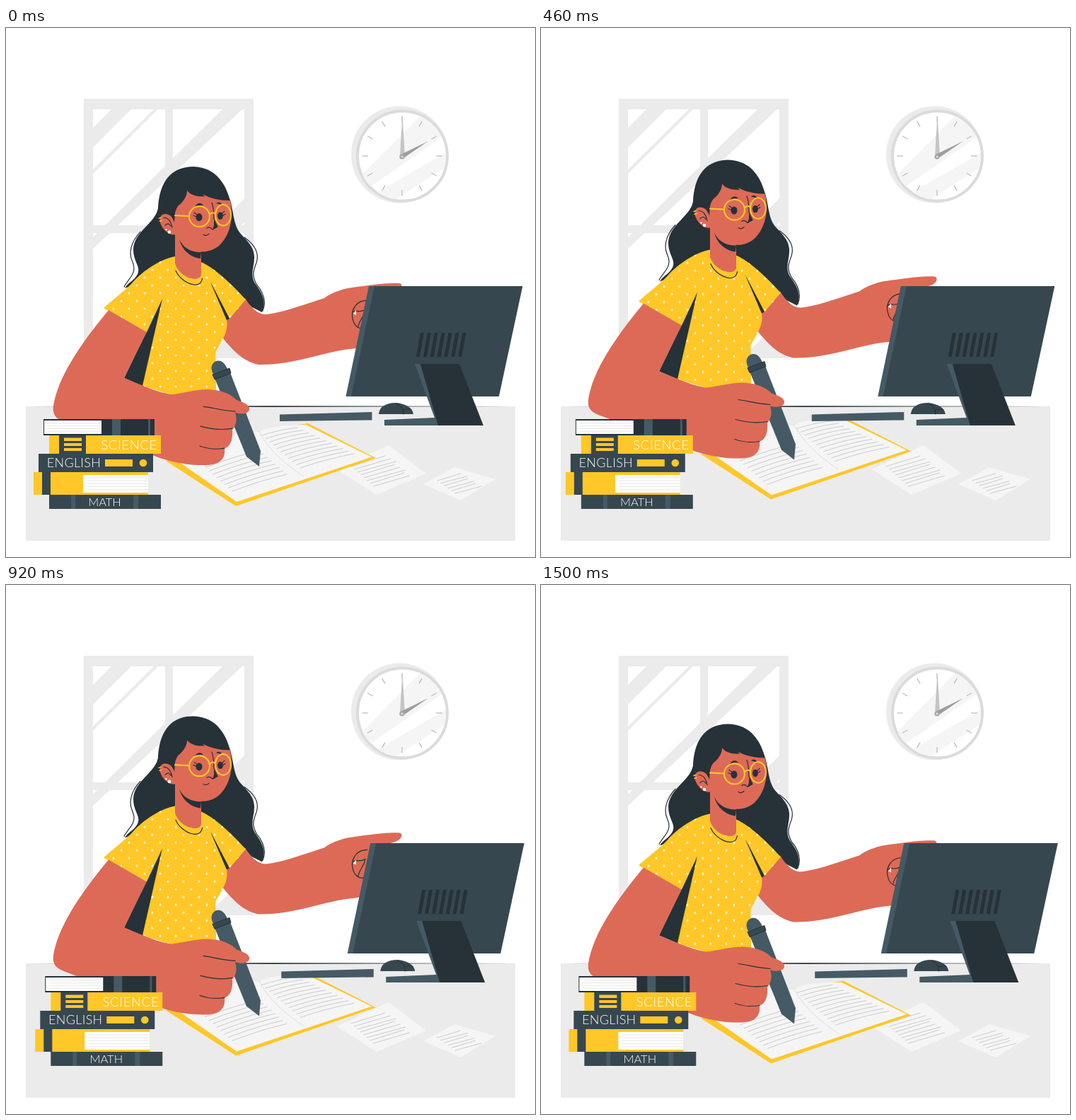
Recreate the animation shown at these times as an HTML page. Size 748 by 748 pixels, loop 1.54 s.

```html
<!DOCTYPE html>
<html lang="en">
<head>
<meta charset="utf-8">
<title>Study desk</title>
<style>
html,body{margin:0;width:100%;height:100%;overflow:hidden;background:#fff}
svg{display:block;width:100vw;height:100vh}
text{font-family:Lato,"Open Sans",sans-serif;font-weight:300;fill:#fff;text-anchor:middle}
.d{fill:#263238}.m{fill:#37474f}.l{fill:#455a64}.y{fill:#ffc727}.s{fill:#dd6a57}
.g{fill:#ebebeb}.p{fill:#f5f5f5}.w{fill:#fff}
.line{fill:none;stroke:#263238;stroke-width:1.2;stroke-linecap:round;stroke-linejoin:round}
.rim{fill:none;stroke:#ffc727;stroke-width:2.1;stroke-linecap:round}
.thin{stroke-width:1.4}
.ink{fill:none;stroke:#c7c7c7;stroke-width:.9;stroke-linecap:round}
.fold{fill:none;stroke:#dedede}
</style>
</head>
<body>
<svg viewBox="0 0 748 748">
<defs>
  <pattern id="dots" width="22" height="22" patternUnits="userSpaceOnUse" patternTransform="translate(202 359)">
    <circle cx="5" cy="5" r="1.4" fill="#fff"/><circle cx="16" cy="16" r="1.4" fill="#fff"/>
  </pattern>
  <clipPath id="glass"><path d="M123 115H225V279H123ZM236 115H337V279H236ZM123 290H225V453H123ZM236 290H337V453H236Z"/></clipPath>
  <clipPath id="dial"><circle cx="560" cy="181" r="62"/></clipPath>
  <path id="cloth" d="M239 323C221 326 194 342 178 361C166 373 152 383 138 396L199 430L221 383L193 506L235 519L297 520V485C298 475 295 465 297 457C305 442 315 431 312 412L289 359L316 411L339 384C319 362 296 340 276 331Z"/>
</defs>

<g id="window">
  <path class="g" d="M110 100H350V467H110Z"/>
  <g clip-path="url(#glass)">
    <path class="w" d="M110 100H350V467H110Z"/>
    <path class="g" d="M149 115H177L123 169V141ZM209 115H215L123 206V200ZM306 115H334L123 312V296ZM337 241V275L200 412V378ZM337 415V453H298Z"/>
  </g>
</g>

<g id="clock">
  <circle class="g" cx="556.5" cy="179" r="68.5"/>
  <circle class="w" cx="560.5" cy="181" r="63.5" stroke="#dbdbdb" stroke-width="4"/>
  <g clip-path="url(#dial)" class="p">
    <path d="M500 211L590 120L618 153L516 224Z"/><path d="M524 233L626 174V194L545 246Z"/>
  </g>
  <g id="ticks" stroke="#bdbdbd" stroke-width="1.3"></g>
  <path fill="#c4c4c4" d="M560.5 123L564 181H557Z"/>
  <path fill="#9e9e9e" d="M597 160L562 184L558 179Z"/>
  <circle cx="560" cy="182" r="3.6" fill="#a6a6a6"/><circle cx="560" cy="182" r="1.6" fill="#dbdbdb"/>
</g>

<path class="g" d="M28 535H720V725H28Z"/>
<path class="d" d="M30 535L374 534.3L718 535L374 535.9Z"/>
<path class="p" d="M541 590L594 630L524 660L468 624ZM634 621L692 638L643 668L590 645Z"/>
<g id="notes" class="ink"></g>

<g id="girl">
  <g id="hairback">
    <path class="d" d="M215 255C211 276 181 288 180 313C180 331 191 337 186 348C182 357 172 360 168 368L245 340L300 370L362 402C368 388 364 377 352 361C344 347 352 337 351 322C350 309 341 301 331 290C322 279 322 262 317 243Z"/>
    <path class="line" d="M190 288C176 303 173 319 179 331C186 347 173 354 167 366M337 296C354 308 358 320 354 332C348 347 349 352 354 362C365 375 368 388 363 400"/>
  </g>

  <path class="s" d="M338 382C346 394 355 405 367 405C390 403 424 390 450 382C462 373 478 368 496 366C518 363 544 360 557 361C562 363 560 371 549 374L525 381L515 450L494 453C449 457 408 477 357 476C333 471 319 453 306 438L308 408Z"/>
  <path class="line" d="M511 385C493 385 488 401 490 410C492 422 500 427 508 424M490 402C495 397 499 404 508 398C507 407 499 414 498 422"/>
  <path class="w" d="M491 404L495 399L495 406Z"/>

  <path class="d" d="M221 382L167 495L195 507L230 410ZM288 358L319 405L310 413L296 390Z"/>
  <use href="#cloth" class="y"/>
  <use href="#cloth" fill="url(#dots)"/>
  <path class="d" d="M289 359L316 411L312 413Z"/>

  <g id="head">
    <path class="s" d="M239 278H276V349C273 361 245 353 239 333Z"/>
    <path class="line" d="M240 343C247 360 275 372 277.500 354"/>
    <path class="s" d="M240 250L255 225H300L317 244C322 269 317 291 304 305C292 318 272 320 257 310C247 303 239 291 238 275Z"/>
    <path class="d" d="M245 299C251 312 263 317 276 317L275 326C260 324 249 314 245 299Z"/>
    <path class="d" d="M215 269C213 225 228 196 265 196C298 197 311 222 317 244C302 244 289 241 278 235L281 238C270 239 261 236 256 230C256 240 248 248 243 252C239 258 237 266 237 276L228 266Z"/>
    <path class="s" d="M241 291C234 296 221 286 218 275C216 265 222 261 230 264C237 267 240 279 241 291Z"/>
    <path class="line" d="M223 268C230 268 234 275 235 282M225 279Q230 274 233 280"/>
    <path class="rim thin" d="M216 269L219 268M217 273L220 272"/>
    <circle class="w" cx="231" cy="288.500" r="2.300"/><circle class="w" cx="226.500" cy="285" r="1.300"/>
  </g>

  <g id="face">
    <ellipse class="d" cx="273" cy="267.500" rx="4.500" ry="5.500"/><ellipse class="d" cx="303" cy="265.500" rx="4" ry="5.200"/>
    <path class="line" d="M270 264L266 261M269 267L265 265M306 262L309 259M307 265L310 263"/>
    <path class="d" d="M267 253C270 247 276 246 279 251C275 250 271 251 267 253ZM297 248C301 244 306 248 306 252C303 249 300 248 297 248Z"/>
    <path class="line" d="M291 247C294 255 294 263 294 270L299 281L292 285Q288 280 284 283M279 292Q283 295 287 291"/>
    <path class="d" d="M294 272L299 281L292 285L294 279Z"/>
    <circle class="rim" cx="273.500" cy="266.500" r="14.500"/><ellipse class="rim" cx="307" cy="264.500" rx="11" ry="14.800"/>
    <path class="rim" d="M288 264Q292 259 296 263M239 265L259 266"/>
  </g>

  <g id="notebook">
    <path class="y" d="M226 612L325 676L523 608L427 559L300 580Z"/>
    <path class="p" d="M238 609L326 670L517 606.500L424 561C402 562 373 562 358 571C337 570 312 574 290 582Z"/>
    <path class="fold" d="M358 571C372 597 395 617 421 634"/>
    <g id="script" class="ink"></g>
  </g>

  <g id="pen">
    <path class="l" d="M293 490L315 482L360 598L358 620L340 606Z"/>
    <path class="l" d="M293 489C286 476 296 468 304 471C310 474 312 480 314 484Z"/>
    <path class="m" stroke="#263238" stroke-width="1" d="M292 490L316 481L318 488L295 497Z"/>
  </g>

  <path class="s" d="M145 399C115 435 74 489 67 534C65 550 74 554 88 559L207 604C230 613 252 618 278 618C300 619 311 611 309 594C318 592 321 580 320 568C326 562 327 552 324 544C335 547 345 545 344 537C342 531 334 529 326 526C316 516 303 512 286 511C266 511 250 517 233 518C220 516 207 511 194 506L167 495L199 430Z"/>
  <path class="line" d="M279 535C293 537 307 541 324 542M275 563C290 567 306 569 320 566M274 591C284 595 298 596 309 594"/>
</g>

<g id="desk">
  <g id="computer">
    <path class="l" d="M387 546.500L517.500 543V554.500L387 556ZM535 554L606 551L613 562H535Z"/>
    <path class="m" d="M527 546C528 535 538 530 551 530C565 531 575 537 576 546Z"/>
    <path class="line" d="M552 531Q562 535 562 546M562 540Q570 537 573 540"/>
    <path class="l" d="M513 365H523L489 521H480.500Z"/>
    <path class="m" d="M521 365H730.500L697 521H488Z"/>
    <path class="l" d="M578 475H588L613 562H604L606 551Z"/>
    <path class="d" d="M586 475H641L675 562H611Z"/>
    <g id="vents" class="d"></g>
  </g>

  <g id="books">
    <path class="d" d="M53 553H210V576H53Z"/><path class="w" d="M54 555H135V574H54Z"/>
    <path class="l" d="M150 553H162V576H150ZM201 553H204V576H201Z"/>
    <path class="y" d="M61 576H219V602H61Z"/><path class="m" d="M75 576H113V602H75Z"/>
    <path class="y" d="M82 579.500H107V584H82ZM82 587H107V591H82ZM82 594H107V598H82Z"/>
    <text x="174" y="596" font-size="18.500" letter-spacing=".6">SCIENCE</text>
    <path class="m" d="M46 602H208V628H46Z"/>
    <path class="y" d="M140 610H179V620H140Z"/><circle class="y" cx="194" cy="615" r="5.300"/>
    <text x="96" y="621" font-size="18" letter-spacing=".3">ENGLISH</text>
    <path class="y" d="M39 628H201V660H39Z"/><path class="m" d="M51 628H63V660H51Z"/>
    <path class="w" d="M109 632H201V657H109Z"/>
    <path class="m" d="M61 660H219V680H61Z"/>
    <path class="l" d="M92 660H98V680H92ZM180 660H187V680H180Z"/>
    <text x="139.500" y="675.500" font-size="16.500">MATH</text>
    <g id="leaves" stroke="#e0e0e0" stroke-width=".8"></g>
  </g>
</g>
</svg>
<script>
const $ = id => document.getElementById(id);
const times = (n, f) => Array.from({length: n}, (_, i) => f(i)).join('');
const path = d => `<path d="${d}"/>`;

// A gently bowed line of handwriting
const stroke = (x, y, dx, dy, bow = 0) =>
  path(`M${x} ${y}q${dx / 2} ${dy / 2 + bow} ${dx} ${dy}`);

$('ticks').innerHTML = times(12, i =>
  `<path d="M560 133V124.500" transform="rotate(${i * 30} 560 181)"/>`);
$('vents').innerHTML = times(7, i => path(`M${586 + i * 9.9} 431h5l-6 34h-5z`));
$('leaves').innerHTML =
  times(4, i => path(`M58 ${559 + i * 3.7}H133`)) +
  times(5, i => path(`M114 ${636 + i * 4.2}H200`));
$('notes').innerHTML =
  times(8, i => stroke(488 + i * 4.5, 620 + i * 4, 48 + i % 3 * 3, -15)) +
  times(6, i => stroke(610 + i * 5, 640 + i * 3.6, 33 + i % 2 * 4, -10));
$('script').innerHTML =
  times(8, i => stroke(320 - i * 5.5, 655 - i * 4.8, 77, -24, -3)) +
  times(11, i => stroke(362 + i * 5.4, 576 + i * 4.6, 50 + i * 2.6, -11 - i * .9, -3));

const LOOP = 1540, FRAMES = 37;
const sway = [[0, 0], [4, 3.5], [7, 2.3], [11, -4.2], [16, -2], [19.5, 5.8],
  [22, 2.3], [24.5, -3.5], [26, -2], [29, 2.8], [32, -1], [36, .3], [37, 0]];

const smooth = u => (1 - Math.cos(Math.PI * u)) / 2;
const ease = u => (u + smooth(u)) / 2;

// Rise for 18 steps, then sink for 19
function lift(n) {
  const k = (n + 1) % FRAMES;
  return .5 - 14.1 * (k < 18 ? ease(k / 18) : 1 - ease((k - 18) / 19));
}

function slide(n) {
  const i = sway.findIndex(p => p[0] > n);
  const [a, x] = sway[i - 1], [b, y] = sway[i];
  return x + (y - x) * smooth((n - a) / (b - a));
}

function draw(ms) {
  const n = Math.floor((ms + 3) % LOOP / LOOP * FRAMES);
  $('girl').setAttribute('transform', `translate(0 ${lift(n).toFixed(2)})`);
  $('desk').setAttribute('transform', `translate(${slide(n).toFixed(2)} 0)`);
}

const start = performance.now();
function tick() {
  draw(performance.now() - start);
  requestAnimationFrame(tick);
}
tick();
</script>
</body>
</html>
```
